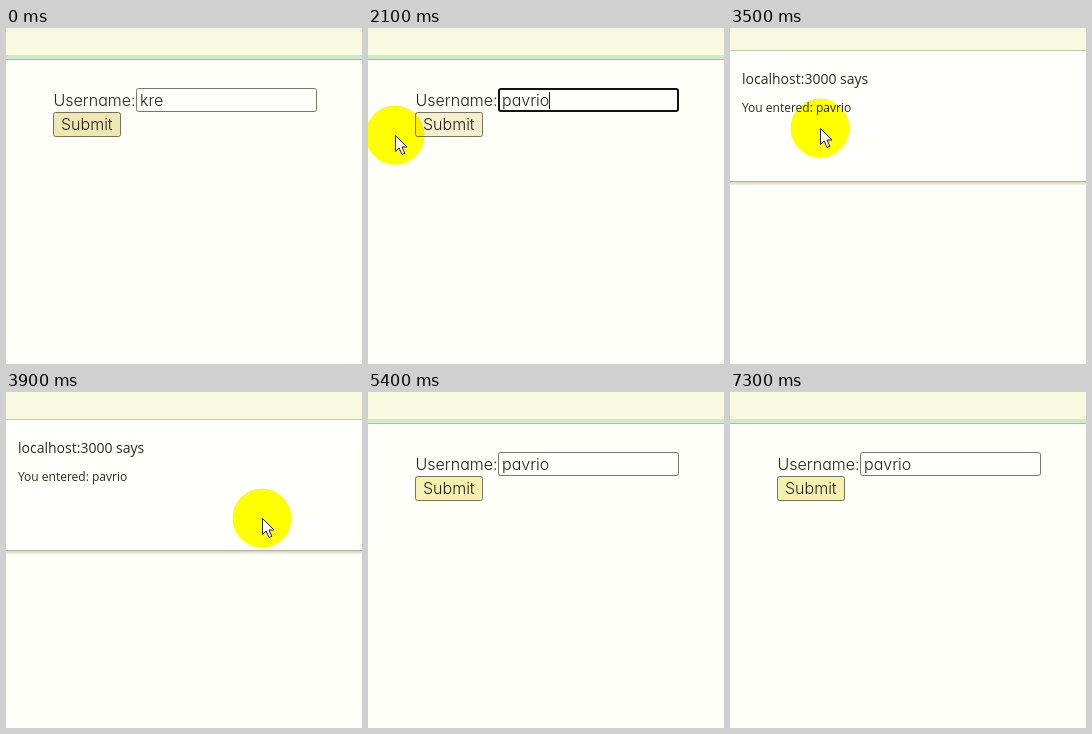
Write an HTML page that moves like this. It is 356 by 336 pixels and loops after 7.7 s.

```html
<!DOCTYPE html>
<html lang="en">
<head>
<meta charset="utf-8">
<title>Username form</title>
<style>
  html, body { margin: 0; width: 100%; height: 100%; overflow: hidden; background: #fffffa; }
  svg { display: block; width: 100%; height: 100%; }
  .form { font: 300 16px Inter, "Open Sans", sans-serif; font-feature-settings: "cv11", "ss01" 0; fill: #22221a; }
  .alert { font-family: "Open Sans", "Noto Sans", sans-serif; fill: #2c2b18; }
  #halo { fill: #ff0; mix-blend-mode: multiply; }
</style>
</head>
<body>
<svg viewBox="0 0 356 336">
  <defs>
    <clipPath id="selClip"><rect id="selArea" y="63" height="19"/></clipPath>
    <linearGradient id="shade" x2="0" y2="1">
      <stop offset="0" stop-color="#a3a170" stop-opacity=".45"/>
      <stop offset="1" stop-color="#a3a170" stop-opacity="0"/>
    </linearGradient>
  </defs>
  <rect width="356" height="336" fill="#fffffa"/>
  <rect width="356" height="27" fill="#f8f9de"/>
  <rect y="27" width="356" height="4" fill="#cdebc9"/>
  <rect y="31" width="356" height="1" fill="#a3c2a6"/>

  <g class="form">
    <text x="47.5" y="78">Username:</text>
    <rect id="field" rx="2" fill="#fffffc"/>
    <rect id="sel" y="63" height="19" fill="#338fe6"/>
    <text id="value" x="134" y="78"></text>
    <text id="picked" x="134" y="78" fill="#fff" clip-path="url(#selClip)"></text>
    <rect id="caret" y="64" width="1" height="17" fill="#222"/>
    <rect id="button" x="47.5" y="84.5" width="67" height="24" rx="2" stroke="#77745c"/>
    <text x="55" y="102">Submit</text>
  </g>

  <g id="alert" class="alert">
    <rect y="27" width="356" height="131" fill="#fffffc"/>
    <rect y="27" width="356" height="1" fill="#b9cfae"/>
    <rect y="158" width="356" height="1" fill="#b0afa2"/>
    <rect y="159" width="356" height="4" fill="url(#shade)"/>
    <text x="12" y="61" font-size="14">localhost:3000 says</text>
    <text x="12" y="89" font-size="12">You entered: pavrio</text>
  </g>

  <g id="pointer">
    <circle id="halo" r="29.5"/>
    <path id="arrow" d="M0.5 0.5V16.5L4.2 13L7 19.5L9.8 18.3L7 12H12Z" fill="#fff" stroke="#222"/>
  </g>
</svg>
<script>
const LOOP = 7700, STEP = 100;
const OLD = "kre", NAME = "pavrio";
const KEYS = [1300, 1500, 1600, 1800, 1900, 2100];
const FOCUS = [300, 3000], DIALOG = [3200, 5400];

// Pointer visits: [ms, x, y]
const VISITS = [
  [[100, 150, 85], [300, 160, 74], [500, 125, 77], [800, 32, 106], [900, 27, 107],
   [2300, 27, 107], [2600, 62, 80], [2800, 79, 83], [3000, 90, 100], [3500, 90, 100],
   [3900, 256, 126], [4400, 388, 150]],
  [[5500, 384, 150], [5800, 320, 156], [5900, 309, 157], [6000, 305, 157],
   [7100, 305, 157], [7200, 319, 161], [7300, 340, 165]]
];

const $ = id => document.getElementById(id);
const clamp = (v, lo, hi) => Math.min(hi, Math.max(lo, v));
const within = (t, [a, b]) => t >= a && t < b;

function set(id, attrs) {
  for (const k in attrs) $(id).setAttribute(k, attrs[k]);
}

function show(id, on) {
  $(id).setAttribute("visibility", on ? "visible" : "hidden");
}

function pointerAt(t) {
  for (const path of VISITS) {
    const i = path.findIndex(p => p[0] > t);
    if (i < 1) continue;
    const [t0, x0, y0] = path[i - 1], [t1, x1, y1] = path[i];
    const k = (t - t0) / (t1 - t0);
    return [x0 + (x1 - x0) * k, y0 + (y1 - y0) * k];
  }
  return null;
}

function drawField(t, pos) {
  const focused = within(t, FOCUS);
  set("field", focused
    ? { x: 131, y: 61, width: 179, height: 22, stroke: "#111", "stroke-width": 2 }
    : { x: 130.5, y: 60.5, width: 180, height: 23, stroke: "#77776c", "stroke-width": 1 });

  const typed = KEYS.filter(k => k <= t).length;
  const text = typed ? NAME.slice(0, typed) : OLD;
  $("value").textContent = $("picked").textContent = text;
  set("button", { fill: focused ? "#f4f0cd" : typed ? "#f6f1b0" : "#eee7b2" });

  const end = 134 + $("value").getComputedTextLength();
  const selecting = focused && !typed && t > FOCUS[0];
  const from = selecting && pos ? clamp(pos[0], 133, end) : end;
  for (const id of ["sel", "selArea"]) set(id, { x: from, width: end - from });
  show("sel", selecting);
  show("picked", selecting);

  const idle = typed ? t - KEYS[typed - 1] : 0;
  set("caret", { x: Math.round(end) });
  show("caret", focused && from === end && idle % 1060 < 530);
}

function drawAlert(t) {
  const open = within(t, DIALOG);
  show("alert", open);
  if (!open) return;
  const enter = clamp((t - DIALOG[0]) / 500, 0, 1);
  const leave = clamp((t - DIALOG[1] + 300) / 300, 0, 1);
  const lift = 17 * Math.pow(1 - enter, 1.35) + 10 * leave;
  set("alert", {
    transform: `translate(0 ${-Math.round(lift)})`,
    opacity: Math.min(1, 0.4 + enter * 2) * (1 - leave)
  });
}

function drawPointer(pos) {
  show("pointer", pos);
  if (!pos) return;
  const move = `translate(${pos.map(Math.round).join(" ")})`;
  set("halo", { transform: move });
  set("arrow", { transform: move });
}

function draw(now) {
  const t = Math.floor((now - start) % LOOP / STEP + 0.01) * STEP;
  const pos = pointerAt(t);
  drawField(t, pos);
  drawAlert(t);
  drawPointer(pos);
}

const start = performance.now();
function tick() {
  draw(performance.now());
  requestAnimationFrame(tick);
}
tick();
</script>
</body>
</html>
```
